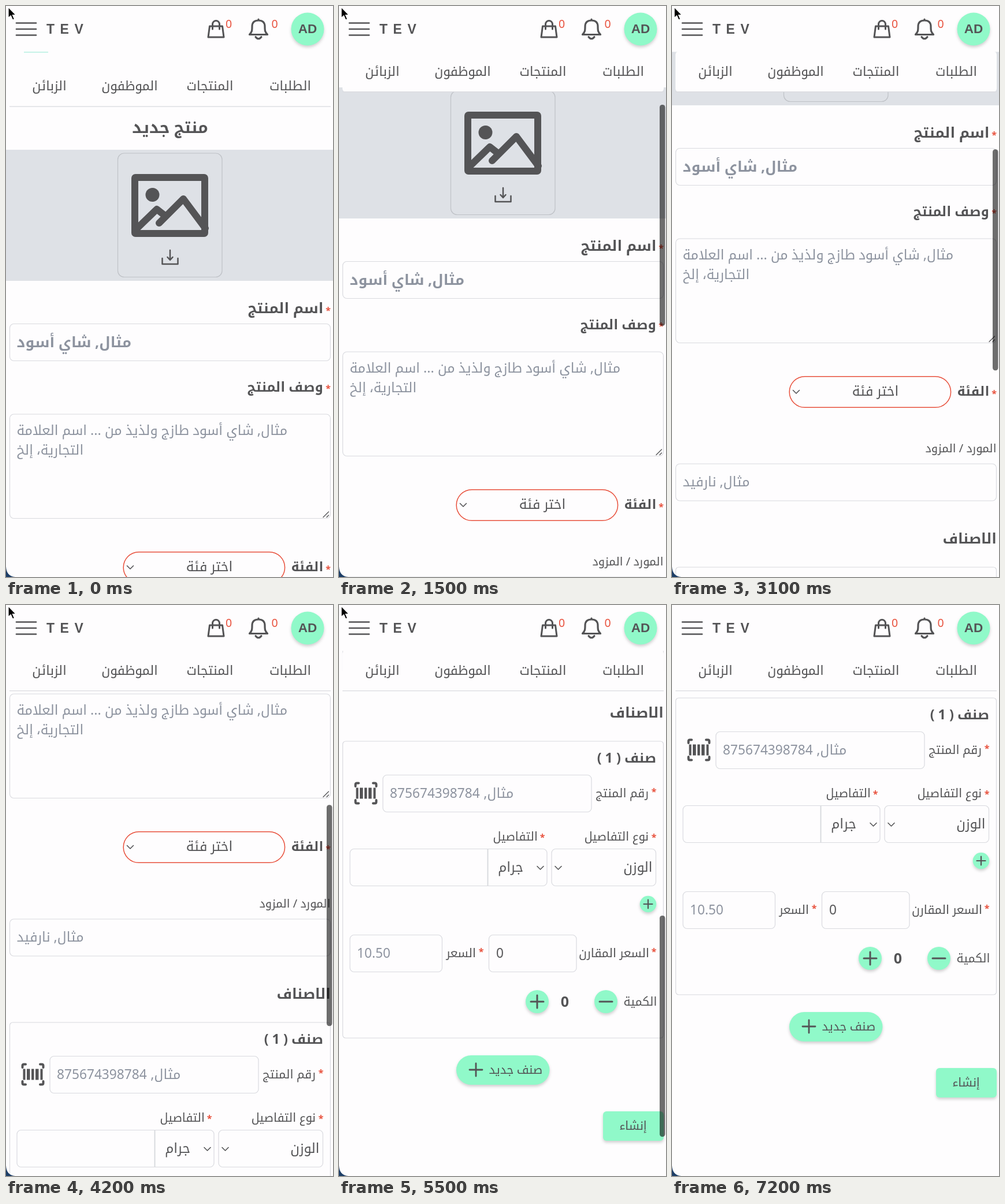
Animation, 566 px wide and 989 px high, one loop 7.3 s. Source, as an HTML page:

```html
<!DOCTYPE html>
<html lang="ar">
<head>
<meta charset="utf-8">
<style>
html, body { margin: 0; width: 100%; height: 100%; overflow: hidden; background: #fefdfe; }
svg { display: block; width: 100%; height: 100%; }
text { font-family: "Noto Sans", "Noto Kufi Arabic", "Noto Sans Arabic", "DejaVu Sans", sans-serif; fill: #545456; }
.ar { direction: rtl; }
.logo { font-family: "Liberation Sans", Arial, sans-serif; font-weight: 700; }
.box { fill: #fefdfe; stroke: #d9dadf; stroke-width: 1.2; }
.line { fill: none; stroke: #545456; stroke-linecap: round; stroke-linejoin: round; }
.mint { fill: #90f9c9; filter: drop-shadow(0 3px 2.5px rgba(0, 0, 0, .18)); }
</style>
</head>
<body>
<svg viewBox="0 0 566 989" preserveAspectRatio="none">
  <g id="page"></g>
  <g id="nav"></g>
  <g id="head"></g>
  <rect id="thumb" x="555" width="9.5" height="383" rx="4.5" fill="#000" fill-opacity=".57"/>
  <path d="M0 971Q1 988 16 989H0Z" fill="#1c3d66"/>
  <path id="cursor" d="M4 2V20.500L8.300 16.700L11.500 24L14.500 22.700L11.400 15.500H17Z" fill="#000" stroke="#fff" stroke-width="1.2"/>
</svg>
<script>
const $ = id => document.getElementById(id);
const GREY = '#8d939f', RED = '#e8503c', INK = '#545456', PAPER = '#fefdfe';

// Arabic glyph widths vary with the available face: one shared size factor
const ctx = document.createElement('canvas').getContext('2d');
ctx.font = '24px "Noto Sans", "Noto Kufi Arabic", "Noto Sans Arabic", "DejaVu Sans", sans-serif';
const arScale = 72 / ctx.measureText('الطلبات').width;

// anchor for Arabic: start = right edge, end = left edge
const ar = (s, x, y, size = 25, { at = 'start', bold = 400, fill = INK } = {}) =>
  `<text class="ar" x="${x}" y="${y}" font-size="${size * arScale}" text-anchor="${at}" font-weight="${bold}" style="fill:${fill}">${s}</text>`;
const num = (s, x, y, { size = 22.7, at = 'start', bold = 400, fill = INK } = {}) =>
  `<text x="${x}" y="${y}" font-size="${size}" text-anchor="${at}" font-weight="${bold}" style="fill:${fill}">${s}</text>`;
const star = (x, y) => num('*', x, y + 9, { size: 16, at: 'middle', bold: 600, fill: RED });
const box = (x, y, w, h, r = 7) => `<rect class="box" x="${x}" y="${y}" width="${w}" height="${h}" rx="${r}"/>`;
const line = (d, w = 2) => `<path class="line" d="${d}" stroke-width="${w}"/>`;
const chevron = (x, y) => line(`M${x - 5.5} ${y - 2.5}l5.500 5.500l5.500-5.500`, 1.6);
const mint = (x, y, w, h, r) => `<rect class="mint" x="${x}" y="${y}" width="${w}" height="${h}" rx="${r}"/>`;
const dot = (x, y, r) => mint(x - r, y - r, 2 * r, 2 * r, r);
const minus = (x, y, r, w) => line(`M${x - r} ${y}h${2 * r}`, w);
const plus = (x, y, r, w) => minus(x, y, r, w) + line(`M${x} ${y - r}v${2 * r}`, w);

const BOLD = { bold: 700 };
const HINT = { at: 'end', fill: GREY };

const photo = `
  <rect y="249" width="566" height="227" fill="#dee1e6"/>
  <rect x="193.500" y="255" width="180.500" height="214.500" rx="11" fill="none" stroke="#bfc2c7" stroke-width="1.2"/>
  <rect x="223" y="297" width="121" height="97" rx="1" fill="none" stroke="${INK}" stroke-width="12"/>
  <circle cx="253.500" cy="327" r="12" fill="${INK}"/>` +
  line('M227 385L261 352L275 363M265 376L307 334L345 385', 12) +
  line('M284 423V439M279.500 435L284 440L288.500 435M270.500 437V447H297.500V437', 2.5);

const scanner = line('M28.500 1354v-3q0-2.500 2.500-2.500h3M59 1348.500h3q2.500 0 2.500 2.500v3M64.500 1378v3q0 2.500-2.500 2.500h-3M34 1383.500h-3q-2.500 0-2.500-2.500v-3', 4) +
  [[29.5, 4], [36, 5.5], [44, 4.5], [51, 5.5], [59.5, 4]]
    .map(([x, w]) => `<rect x="${x}" y="1356.500" width="${w}" height="19" fill="${INK}"/>`).join('');

$('page').innerHTML = [
  '<rect x="31" y="78.500" width="42" height="2" fill="#90e9d3"/>',
  ar('منتج جديد', 284, 220, 30, { at: 'middle', bold: 700 }),
  photo,

  star(557.5, 523.5), ar('اسم المنتج', 549.5, 532, 27, BOLD),
  box(6.5, 550.5, 555, 64), ar('مثال, شاي أسود', 18.5, 591, 27, { ...HINT, bold: 700 }),

  star(557.5, 659), ar('وصف المنتج', 549, 668, 24.7, BOLD),
  box(6.5, 707, 555, 180.5),
  ar('مثال, شاي أسود طازج ولذيذ من ... اسم العلامة', 18.5, 743, 25.1, HINT),
  ar('التجارية، إلخ', 18.5, 777, 25.1, HINT),
  line('M549 885.500L558.500 876M555 885.500L558.500 882', 1.3),

  star(557.5, 972), ar('الفئة', 549.5, 979, 24.5, BOLD),
  `<rect x="203.200" y="945.700" width="279.400" height="53.600" rx="26.800" fill="${PAPER}" stroke="${RED}" stroke-width="1.5"/>`,
  chevron(215, 972), ar('اختر فئة', 352, 979, 25, { at: 'middle' }),

  ar('المورد / المزود', 561.5, 1077, 21.5),
  box(6.5, 1097, 555, 64), ar('مثال, نارفيد', 18.5, 1136, 25, HINT),

  ar('الاصناف', 562, 1235, 26.5, BOLD),
  box(6.5, 1276, 555, 514, 5),
  ar('صنف ( 1 )', 549, 1313, 25, BOLD),
  star(545, 1359.5), ar('رقم المنتج', 536, 1373, 22.3),
  box(76, 1334.5, 361, 64),
  num('875674398784', 88, 1374, { fill: GREY }), ar('مثال,', 302.5, 1374, 25, { fill: GREY }),
  scanner,

  star(545, 1438.5), ar('نوع التفاصيل', 536, 1448, 22),
  star(352, 1438.5), ar('التفاصيل', 344, 1448, 22),
  box(368, 1462.5, 180.5, 64), chevron(379.5, 1495), ar('الوزن', 542.5, 1502),
  box(19, 1462.5, 341, 64), '<path d="M257.500 1462.500v64" stroke="#d9dadf" stroke-width="2"/>',
  chevron(348.5, 1495), ar('جرام', 319, 1502),
  dot(535, 1558, 14.3), plus(535, 1558, 7.5, 2.2),

  star(545, 1637), ar('السعر المقارن', 537, 1650, 22.3),
  box(259.5, 1611.5, 151.5, 64), num('0', 272, 1651),
  star(246, 1637), ar('السعر', 237, 1650, 22.3),
  box(19, 1611.5, 159.5, 64), num('10.50', 31, 1651, { fill: GREY }),

  ar('الكمية', 550.5, 1734, 22),
  dot(462, 1727, 20), minus(462, 1727, 11, 3),
  num('0', 391, 1736, { size: 25, at: 'middle', bold: 700 }),
  dot(343, 1727, 20), plus(343, 1727, 11, 3),

  mint(203, 1820, 161.5, 51, 25.5), plus(237, 1845, 11, 2.8),
  ar('صنف جديد', 352, 1852, 22, { bold: 500 }),
  mint(457, 1917, 105, 51, 6), ar('إنشاء', 509, 1949, 22, { at: 'middle', bold: 500 }),
].join('');

$('nav').innerHTML = `<rect x="6" y="104" width="556" height="70.500" rx="6" fill="${PAPER}"/>` +
  '<path d="M6 174.200H562" stroke="#d9dadf" stroke-width="1.3"/>' +
  [['الطلبات', 492], ['المنتجات', 353], ['الموظفون', 214], ['الزبائن', 75]]
    .map(([s, x]) => ar(s, x, 146, 24, { at: 'middle' })).join('');

$('head').innerHTML = `<rect width="566" height="79.500" fill="${PAPER}"/>` +
  [29.5, 40, 50.5].map(y => line(`M18 ${y}H52`, 2.7)).join('') +
  '<text class="logo" x="70" y="47.500" font-size="23" letter-spacing="9.500">TEV</text>' +
  line('M352.500 35H374.500L377 54H350ZM357.500 40V31.500A6 6 0 0 1 369.500 31.500V40', 3) +
  line('M421.500 49.500C426 45 426 42 426 35.500C426 28 430.500 25 437 25C443.500 25 448 28 448 35.500C448 42 448 45 452.500 49.500ZM437 25V23M432 53.500Q437 60 442 53.500', 3.2) +
  num('0', 385.5, 38, { size: 19.5, at: 'middle', bold: 500, fill: RED }) +
  num('0', 465, 38, { size: 19.5, at: 'middle', bold: 500, fill: RED }) +
  dot(522, 40, 28.5) +
  '<text class="logo" x="522" y="47" font-size="22.500" text-anchor="middle">AD</text>';

// [time, scroll] joined by a monotone cubic
const keys = [[0, 0], [300, 0], [700, 40], [1100, 40], [1500, 108], [1700, 108], [3100, 304], [3300, 306],
  [3600, 306], [4200, 553], [5000, 786], [5500, 1040], [5900, 1115], [7300, 1115]];
const slope = i => keys[i + 1] ? (keys[i + 1][1] - keys[i][1]) / (keys[i + 1][0] - keys[i][0]) : 0;
const tangent = i => {
  const a = i ? slope(i - 1) : 0, b = slope(i);
  return a * b > 0 ? 2 * a * b / (a + b) : 0;
};
function scrollAt(t) {
  const i = keys.findIndex((k, n) => n === keys.length - 2 || t < keys[n + 1][0]);
  const [t0, y0] = keys[i], [t1, y1] = keys[i + 1];
  const d = t1 - t0, u = (t - t0) / d, v = 1 - u;
  return y0 * v * v * (1 + 2 * u) + y1 * u * u * (3 - 2 * u) + d * u * v * (v * tangent(i) - u * tangent(i + 1));
}

function thumbAlpha(t) {
  if (t < 400 || (t >= 1000 && t < 1200)) return 0;
  const end = t < 1000 ? 900 : 6400;
  return t < end ? 1 : t < end + 100 ? .5 : 0;
}

function draw(now) {
  const t = Math.floor(now % 7300 / 100) * 100;
  const y = Math.round(scrollAt(t));
  $('page').setAttribute('transform', `translate(0 ${-y})`);
  $('nav').setAttribute('transform', `translate(0 ${-Math.min(y, 25.5)})`);
  $('thumb').setAttribute('y', 128.5 + .3938 * y);
  $('thumb').setAttribute('opacity', thumbAlpha(t));
  $('cursor').setAttribute('visibility', t < 6500 ? 'visible' : 'hidden');
}
const start = performance.now();
function tick() {
  draw(performance.now() - start);
  requestAnimationFrame(tick);
}
draw(0);
requestAnimationFrame(tick);
</script>
</body>
</html>
```
